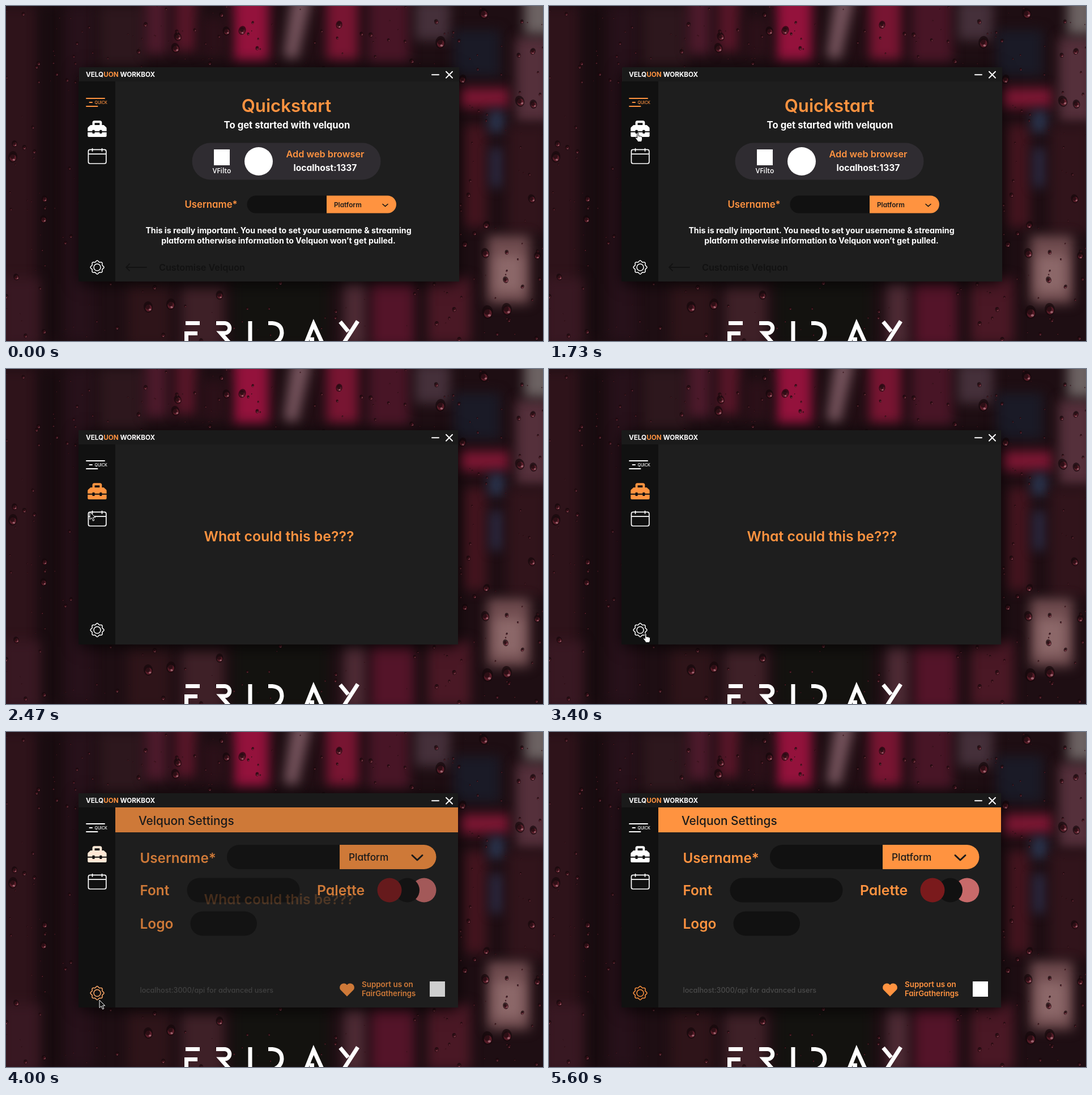
An HTML page with a canvas that plays this animation: 948x591 px, repeating every 7540 ms.

```html
<!DOCTYPE html>
<html lang="en">
<head>
<meta charset="utf-8">
<title>Toolbox window</title>
<style>
  html, body { margin: 0; width: 100%; height: 100%; overflow: hidden; background: #1c0d11; }
  canvas, svg { position: absolute; left: 0; top: 0; width: 948px; height: 591px; }
  text { font-family: Inter, sans-serif; font-weight: 600; font-feature-settings: "cv11"; white-space: pre; }
</style>
</head>
<body>
<canvas id="wallpaper" width="948" height="591"></canvas>
<svg id="stage" viewBox="0 0 948 591"></svg>
<script>
const LOOP = 7540, STEP = 1000 / 15;
const ORANGE = '#ff9340', WHITE = '#fff', INK = '#111', PANEL = '#1e1e1e';

// ---- Wallpaper: blurred street lights behind a wet window ----
const lights = [
  [-20, 0, 75, 591, '#2e131a'], [60, 0, 42, 591, '#190c10'], [105, 0, 50, 591, '#27111a'],
  [165, 0, 80, 110, '#2d171d'], [245, -20, 40, 105, '#4c1a2b'], [298, -20, 38, 100, '#561628'],
  [402, -20, 62, 116, '#94123c'], [345, 20, 45, 70, '#2b1018'], [530, -10, 28, 110, '#220e14'],
  [566, -20, 56, 115, '#781532'], [640, -20, 72, 120, '#481526'], [722, -10, 62, 70, '#45303a'],
  [790, 42, 82, 82, '#1a1a26'], [800, 145, 88, 34, '#7c1733'], [808, 210, 40, 180, '#43151f'],
  [853, 185, 26, 38, '#2b3752'], [855, 250, 22, 70, '#2b2a42'], [900, 55, 60, 150, '#55303b'],
  [915, -20, 50, 70, '#6c6262'], [885, 210, 70, 190, '#31141b'], [850, 405, 75, 120, '#704c4f'],
  [862, 440, 50, 65, '#8c6869'], [-10, 480, 70, 120, '#381822'], [215, 490, 75, 110, '#2e1419'],
  [310, 495, 75, 110, '#3e2027'], [400, 480, 170, 120, '#13120f'], [596, 485, 40, 115, '#4d2a34'],
  [645, 485, 75, 115, '#541429'], [745, 480, 75, 115, '#4a1825']
];
const bigDrops = [
  [767, 64, 11], [389, 44, 8], [417, 43, 8], [303, 54, 8], [299, 74, 9], [843, 13, 10],
  [588, 33, 7], [907, 168, 10], [930, 80, 6], [931, 173, 8], [12, 266, 10], [15, 243, 6],
  [846, 436, 9], [884, 535, 11], [850, 540, 12], [251, 531, 10], [291, 526, 10], [377, 510, 8],
  [848, 386, 7], [882, 483, 6], [928, 340, 8], [68, 340, 6], [66, 376, 7], [806, 129, 8],
  [938, 440, 7], [18, 478, 6], [810, 420, 6]
];

let seed = 37;
const random = () => (seed = (seed * 16807) % 2147483647) / 2147483647;

function drawDrop(ctx, x, y, r) {
  const oval = (dx, dy, rx, ry, color) => {
    ctx.fillStyle = color;
    ctx.beginPath();
    ctx.ellipse(dx, dy, rx, ry, 0, 0, 7);
    ctx.fill();
  };
  ctx.save();
  ctx.translate(x, y);
  ctx.rotate(random() * 0.8 - 0.4);
  oval(0, 0, r * 0.8, r, 'rgba(20,8,11,.68)');
  oval(r * 0.05, r * 0.2, r * 0.58, r * 0.62, 'rgba(125,38,55,.6)');
  oval(-r * 0.1, -r * 0.1, r * 0.42, r * 0.48, 'rgba(28,10,14,.7)');
  oval(r * 0.25, r * 0.5, r * 0.22, r * 0.16, 'rgba(205,150,160,.6)');
  ctx.restore();
}

function drawWallpaper(ctx) {
  ctx.fillStyle = '#1e0e13';
  ctx.fillRect(0, 0, 948, 591);
  ctx.filter = 'blur(10px)';
  for (const [x, y, w, h, color] of lights) {
    ctx.fillStyle = color;
    ctx.fillRect(x, y, w, h);
  }
  ctx.fillStyle = '#75535c';
  ctx.beginPath();
  ctx.moveTo(505, -15); ctx.lineTo(540, -15); ctx.lineTo(514, 95); ctx.lineTo(490, 90);
  ctx.fill();
  ctx.filter = 'none';
  for (let i = 0; i < 420; i++) {
    drawDrop(ctx, random() * 948, random() * 591, 1 + 3.6 * random() ** 2);
  }
  for (const drop of bigDrops) drawDrop(ctx, ...drop);

  ctx.strokeStyle = WHITE;
  ctx.lineWidth = 7;
  ctx.stroke(new Path2D(`M317 559.5H342M315 577.5H338M318.5 577V595
    M371 559.5H386A8.5 8.5 0 0 1 386 577H379L395 595M431 556V595
    M463 559.5H470Q487 561 487 577Q486 590 473 595
    M529 596L543 561L559 596M536 588H544M590 557L604 574M621 556L596 595`));

  ctx.shadowColor = 'rgba(0,0,0,.75)';
  ctx.shadowBlur = 26;
  ctx.shadowOffsetY = 5;
  ctx.fillStyle = PANEL;
  ctx.fillRect(129, 109, 668, 376);
}

// ---- Window parts ----
const text = (x, y, size, fill, content, weight = 600) =>
  `<text x="${x}" y="${y}" font-size="${size}" fill="${fill}"
    style="font-weight:${weight}">${content}</text>`;
const centered = (x, y, size, fill, content, weight = 700) =>
  `<g text-anchor="middle">${text(x, y, size, fill, content, weight)}</g>`;
const box = (x, y, w, h, fill, r = 0) =>
  `<rect x="${x}" y="${y}" width="${w}" height="${h}" rx="${r}" fill="${fill}"/>`;
const disc = (x, y, r, fill) => `<circle cx="${x}" cy="${y}" r="${r}" fill="${fill}"/>`;
const line = (d, color, width = 2) =>
  `<path d="${d}" fill="none" stroke="${color}" stroke-width="${width}"
    stroke-linecap="round" stroke-linejoin="round"/>`;

function gear(cx, cy, color) {
  const points = Array.from({ length: 96 }, (_, i) => {
    const a = i / 96 * Math.PI * 2, r = 10.8 + 1.1 * Math.cos(8 * a);
    return `${(cx + r * Math.cos(a)).toFixed(2)} ${(cy + r * Math.sin(a)).toFixed(2)}`;
  });
  return line(`M${points.join('L')}Z`, color, 1.5) +
    `<circle cx="${cx}" cy="${cy}" r="6" fill="none" stroke="${color}" stroke-width="1.5"/>`;
}

const toolbox = color =>
  `<rect x="154.5" y="204.2" width="12.8" height="9" rx="1.5" fill="none"
    stroke="${color}" stroke-width="4"/>
  <path d="M149.2 210H172.6L176.7 213.8Q177.6 214.7 177.6 216V220.8H144.2V216Q144.2 214.7 145.1 213.8Z
    M144.2 222.8H177.6V229Q177.6 231 175.6 231H146.2Q144.2 231 144.2 229Z" fill="${color}"/>` +
  box(152.4, 218.8, 4.2, 6.2, INK, 1) + box(165.2, 218.8, 4.2, 6.2, INK, 1);

function usernameField(x, y, split, end, h) {
  const r = h / 2;
  return box(x, y, end - x, h, INK, r) +
    `<path d="M${split} ${y}H${end - r}a${r} ${r} 0 0 1 0 ${h}H${split}Z" fill="${ORANGE}"/>`;
}

function frame(active, left, right, shiftY) {
  const tint = name => name === active ? ORANGE : WHITE;
  const quick = tint('quick');
  return box(left, 108, right - left, 25.5, '#1a1a1a') +
    box(193, 133, right - 193, 353, PANEL) + box(128, 133, 65, 353, INK) +
    text(141, 124.7, 11.7, WHITE, `VELQ<tspan fill="${ORANGE}">UON</tspan> WORKBOX`, 700) +
    line('M752 121.2H764', WHITE) + line('M777 115.8L788 126.8M788 115.8L777 126.8', WHITE) +
    `<g transform="translate(0 ${shiftY})">` +
    line('M142 163H174M147.5 170H152M142 177H161.5', quick, 1.9) +
    text(156.5, 172.7, 7, quick, 'QUICK', 500) +
    toolbox(tint('tools')) +
    `<rect x="145.4" y="253.4" width="31.4" height="24.6" rx="3" fill="none"
      stroke="${WHITE}" stroke-width="1.7"/>` +
    line('M146 261.2H176M152.5 251.5V256M169.5 251.5V256', WHITE, 1.7) + '</g>' +
    gear(161, 461 + shiftY / 2, tint('settings'));
}

const quickPage = frame('quick', 130, 800, 0) +
  centered(495, 186.5, 31.2, ORANGE, 'Quickstart', 600) +
  centered(496, 216, 16.7, WHITE, 'To get started with velquon') +
  box(328.5, 241.5, 333, 65, '#2f2c31', 32.5) +
  box(367, 253, 28, 28, WHITE) +
  `<text x="381" y="295" font-size="12" fill="${WHITE}" text-anchor="middle"
    style="font-family:'Open Sans',sans-serif">VFilto</text>` +
  disc(446, 274, 25, WHITE) +
  centered(563.5, 267, 16.3, ORANGE, 'Add web browser', 600) +
  centered(563.5, 291, 15.6, WHITE, 'localhost:1337') +
  text(315.5, 356, 16.8, ORANGE, 'Username*') +
  usernameField(425.5, 334.5, 566, 689, 31) +
  text(579, 354.5, 11.8, '#1a1a1a', 'Platform') + line('M665 349.5L669.5 353.5L674 349.5', INK, 1.6) +
  centered(481, 401, 14.2, WHITE, 'This is really important. You need to set your username &amp; streaming') +
  centered(481, 419, 14.2, WHITE, 'platform otherwise information to Velquon won’t get pulled.') +
  line('M248 461H212M218 455L212 461L218 467', '#121212', 1.8) +
  text(270, 467, 16.2, '#121212', 'Customise Velquon');

const mysteryPage = frame('tools', 128, 798, -1) +
  centered(482, 304, 24.8, ORANGE, 'What could this be???', 600);

const settingsPage = frame('settings', 128, 798, -1) +
  box(193, 133, 605, 44, ORANGE) +
  text(234, 164, 20.8, '#1a1a1a', 'Velquon Settings', 500) +
  text(236.5, 230.5, 24.2, ORANGE, 'Username*') +
  usernameField(390, 199, 589, 759.5, 43) +
  text(605, 227, 17.3, '#1a1a1a', 'Platform', 500) +
  line('M717 217.5L726 226L735 217.5', '#1a1a1a', 3) +
  text(236.5, 287.5, 24.3, ORANGE, 'Font') + box(319.5, 257.5, 199, 43, INK, 21.5) +
  text(549, 287.5, 24.8, ORANGE, 'Palette') +
  disc(738, 279, 21.5, '#c86a6a') + disc(708.5, 279, 21.5, INK) + disc(677, 279, 21.5, '#7a1a1c') +
  text(236.5, 346.5, 24.5, ORANGE, 'Logo') + box(325.5, 316.5, 117.5, 43, INK, 21.5) +
  text(236.5, 460, 12.6, '#4b4b4b', 'localhost:3000/api for advanced users', 500) +
  `<path d="M602 466.5L590.6 455A6.7 6.7 0 0 1 602 446.2A6.7 6.7 0 0 1 613.4 455Z" fill="${ORANGE}"/>` +
  text(628, 449.5, 13.4, ORANGE, 'Support us on') +
  text(628, 466, 13.2, ORANGE, 'FairGatherings') +
  box(748, 440, 27, 27, WHITE);

const cursors = `<g id="cursor" stroke-linejoin="round">
  <path id="arrow" d="M0 0V13.5L3.2 10.6L5.6 16L7.8 15L5.5 9.8H9.8Z" fill="#111" stroke="#fff"/>
  <path id="hand" d="M3.5 10V2Q3.5 .5 4.8 .5Q6 .5 6 2V6.5Q7 5.5 8 6.8Q9.3 6 10.2 7.4Q12.5 6.8 12.5 9V12
    Q12.5 14 11 16.5H5Q3.5 13.5 1 11Q0 9 1.5 8.8Q2.5 8.8 3.5 10Z" fill="#fff" stroke="#111"/></g>`;

// ---- Motion ----
const cursorPath = [
  [470, 32, 468], [730, 72, 372], [1130, 145, 214], [1200, 151, 208], [1330, 153, 207],
  [1470, 153, 207], [1530, 154, 221], [1670, 153, 222], [1800, 150, 224], [2200, 153, 225],
  [2470, 148, 252], [2800, 166, 418], [2930, 165, 448], [3070, 165, 449], [3130, 165, 465],
  [3870, 167, 467], [4400, 159, 492], [4530, 154, 504], [4730, 144, 523], [4930, 142, 526],
  [5130, 140, 528], [5600, 63, 593]
];

function cursorAt(t) {
  const next = cursorPath.findIndex(([time]) => time > t);
  if (next < 1) return null;
  const [t0, x0, y0] = cursorPath[next - 1], [t1, x1, y1] = cursorPath[next];
  const k = (t - t0) / (t1 - t0);
  return [x0 + (x1 - x0) * k, y0 + (y1 - y0) * k];
}

function dissolve(t, start) {
  const p = Math.min(1, Math.max(0, (t - start) / 300));
  return p * p * (3 - 2 * p);
}

const byId = id => document.getElementById(id);
const show = (id, visible) => byId(id).setAttribute('visibility', visible ? 'inherit' : 'hidden');

function render(now) {
  // The screen refreshes its pose 15 times a second.
  const t = Math.floor((now % LOOP + 5) / STEP) * STEP;
  const mystery = dissolve(t, 2120), settings = dissolve(t, 3790);
  byId('mystery').setAttribute('opacity', mystery);
  byId('settings').setAttribute('opacity', settings);
  show('quick', mystery < 1);
  show('mystery', settings < 1);

  const position = cursorAt(t);
  show('cursor', position);
  if (position) {
    byId('cursor').setAttribute('transform', `translate(${position.map(Math.round).join(' ')})`);
    const overIcon = (t > 1060 && t < 2130) || (t > 3120 && t < 3800);
    show('hand', overIcon);
    show('arrow', !overIcon);
  }
  requestAnimationFrame(render);
}

drawWallpaper(byId('wallpaper').getContext('2d'));
byId('stage').innerHTML = `<g id="quick">${quickPage}</g><g id="mystery">${mysteryPage}</g>
  <g id="settings">${settingsPage}</g>${cursors}`;
render(performance.now());
</script>
</body>
</html>
```
